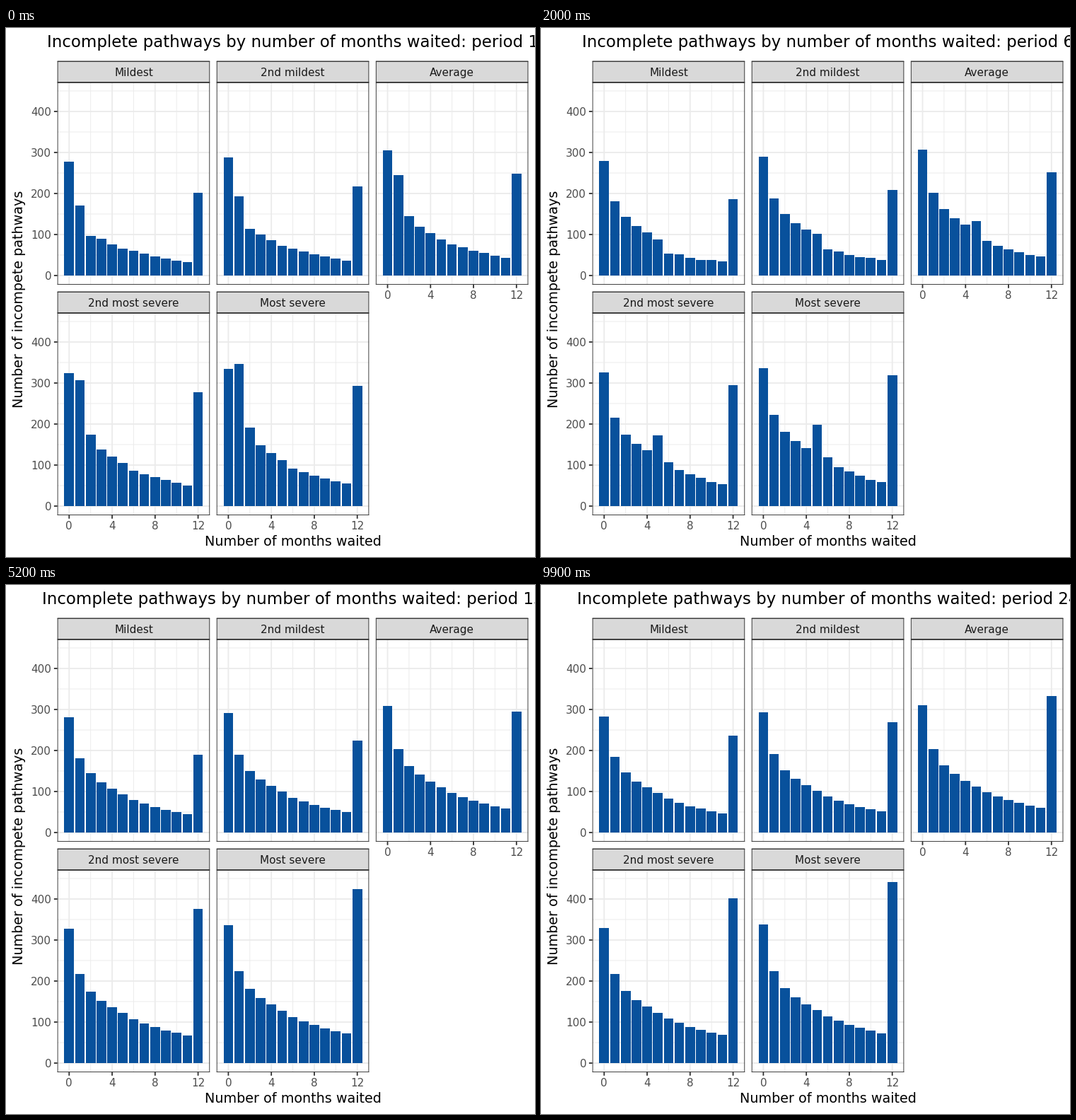
These frames come from a looping animation (748 by 748 pixels, 10 s). A matplotlib script:

```python
import numpy as np
import matplotlib.pyplot as plt
from matplotlib.animation import FuncAnimation
from matplotlib.patches import Rectangle

plt.rcParams["font.family"] = "DejaVu Sans"

SIZE, DPI = 748, 100
FRAMES, INTERVAL, PERIODS = 100, 100, 24
MONTHS = np.arange(12)

# Stage geometry in pixels
LEFT, PANEL_W, STEP_X = 72.66, 215.56, 225.11
TOP, BOTTOM, STEP_Y = 77.0, 363.0, 326.0
STRIP_TOP, BASE = 47.0, 350.0
MONTH, UNIT = PANEL_W / 14.19, 0.58
ZERO_X = LEFT + 1.095 * MONTH
MIDDLE = LEFT + STEP_X + PANEL_W / 2
LINE, TICK = 1.85, 4.77
TITLE_PX, LABEL_PX, SMALL_PX = 22.84, 19.1, 15.28

BLUE, DARK, GRID, STRIP = "#08519C", "#333333", "#EBEBEB", "#D9D9D9"

LABELS = ["Mildest", "2nd mildest", "Average", "2nd most severe", "Most severe"]
SEVERITY = np.sin(0.7 * np.arange(-2, 3)) / np.sin(1.4)


def profile(severity, centre, spread):
    """Queue by month waited: a log-linear curve, shifted by severity."""
    x, y = zip(*centre)
    curve = np.exp(np.interp(MONTHS, x, np.log(y)))
    return curve + severity * np.interp(MONTHS, *zip(*spread))


def first_queue(severity):
    queue = profile(severity,
                    [(0, 306), (2, 144), (3, 119.5), (6, 76.4), (11, 43.6)],
                    [(0, 28), (2, 47), (3, 29.5), (5, 24), (6, 15.5), (11, 11)])
    queue[1] = 244 * np.exp(0.353 * severity)
    return queue


def last_queue(severity):
    return profile(severity,
                   [(0, 311), (1, 204.3), (2, 164.3), (3, 142.3),
                    (5, 112.6), (6, 97.8), (8, 78.7), (11, 60)],
                   [(0, 27.5), (1, 20.5), (2, 18), (11, 12.9)])


def simulate(severity):
    """Age each cohort month by month; bar 12 collects the longest waits."""
    first, last = first_queue(severity), last_queue(severity)
    long_wait = 247.5 + 46 * severity
    rows = []
    for period in range(1, PERIODS + 1):
        growth = ((period - 1) / (PERIODS - 1)) ** 0.6
        drift = 0.0027 * np.exp(-0.85 * severity) * (1 - (period / PERIODS) ** 2)
        entry = first.copy()
        entry[0] += (last[0] - first[0]) * growth
        age = np.maximum(MONTHS - period + 1, 0)
        queue = entry[age] / last[age] * last * (1 - drift) ** (MONTHS - age)
        rows.append([*queue, long_wait])
        keep = (0.8415 + 0.0075 * severity) * (1 - drift)
        long_wait = keep * long_wait + (0.91 + 0.02 * severity) * queue[-1]
    return rows


data = [simulate(s) for s in SEVERITY]
starts = [round(p * (FRAMES - 1) / (PERIODS - 1)) for p in range(PERIODS)]

fig = plt.figure(figsize=(SIZE / DPI, SIZE / DPI), dpi=DPI, facecolor="white")
ax = fig.add_axes([0, 0, 1, 1])
ax.set_xlim(0, SIZE)
ax.set_ylim(SIZE, 0)
ax.axis("off")


def rect(x0, y0, x1, y1, color, z):
    patch = Rectangle((x0, y0), x1 - x0, y1 - y0, facecolor=color,
                      linewidth=0, zorder=z, snap=False)
    ax.add_patch(patch)
    return patch


def hline(x0, x1, y, width, color, z):
    rect(x0, y - width / 2, x1, y + width / 2, color, z)


def vline(x, y0, y1, width, color, z):
    rect(x - width / 2, y0, x + width / 2, y1, color, z)


def text(x, y, label, px, color="black", ha="center", **kw):
    return ax.text(x, y, label, fontsize=px * 72 / DPI, color=color, ha=ha,
                   va="baseline", **kw)


def border(x0, y0, x1, y1, above=0):
    half = LINE / 2
    rect(x0, y0, x0 + half, y1, DARK, 5)
    rect(x1 - half, y0, x1, y1, DARK, 5)
    rect(x0, y1 - half, x1, y1, DARK, 5)
    rect(x0, y0 - above, x1, y0 + half, DARK, 5)


def draw_panel(index):
    row, col = divmod(index, 3)
    dx, dy = col * STEP_X, row * STEP_Y
    x0, x1 = LEFT + dx, LEFT + dx + PANEL_W
    y0, y1 = TOP + dy, BOTTOM + dy
    zero_x, base = ZERO_X + dx, BASE + dy

    for value in range(0, 451, 50):
        width = LINE if value % 100 == 0 else LINE / 2
        hline(x0, x1, base - value * UNIT, width, GRID, 1)
    for month in range(0, 13, 2):
        width = LINE if month % 4 == 0 else LINE / 2
        vline(zero_x + month * MONTH, y0, y1, width, GRID, 1)

    rect(x0, STRIP_TOP + dy, x1, y0, STRIP, 2)
    border(x0, STRIP_TOP + dy, x1, y0, above=0.5)
    border(x0, y0, x1, y1)
    text((x0 + x1) / 2, 68 + dy, LABELS[index], SMALL_PX, "#1A1A1A")

    if col == 0:
        for value in range(0, 401, 100):
            y = base - value * UNIT
            hline(x0 - TICK, x0, y, LINE, DARK, 4)
            text(64.2, y + 5.6, str(value), SMALL_PX, "#4D4D4D", "right")
    if index >= 2:
        for month in range(0, 13, 4):
            x = zero_x + month * MONTH
            vline(x, y1, y1 + TICK, LINE, DARK, 4)
            text(x, y1 + 20, str(month), SMALL_PX, "#4D4D4D")

    # Bars sit on whole pixels.
    return [rect(round(zero_x + (m - 0.45) * MONTH), base,
                 round(zero_x + (m + 0.45) * MONTH), base, BLUE, 3)
            for m in range(13)]


bars = [draw_panel(i) for i in range(len(LABELS))]
title = text(MIDDLE, 27, "", TITLE_PX)
text(MIDDLE, 731.5, "Number of months waited", LABEL_PX)
text(24, 383.3, "Number of incompete pathways", LABEL_PX,
     rotation=90, rotation_mode="anchor")


def update(frame):
    # The title rounds the running time; the bars wait for their period.
    shown = int(1.5 + frame * (PERIODS - 1) / (FRAMES - 1))
    current = sum(s <= frame for s in starts) - 1
    title.set_text(f"Incomplete pathways by number of months waited: period {shown}")
    for patches, rows in zip(bars, data):
        for patch, value in zip(patches, rows[current]):
            patch.set_height(-round(value * UNIT))
    return [title]


anim = FuncAnimation(fig, update, frames=FRAMES, interval=INTERVAL,
                     repeat=True, repeat_delay=0, blit=False)
plt.show()
```
